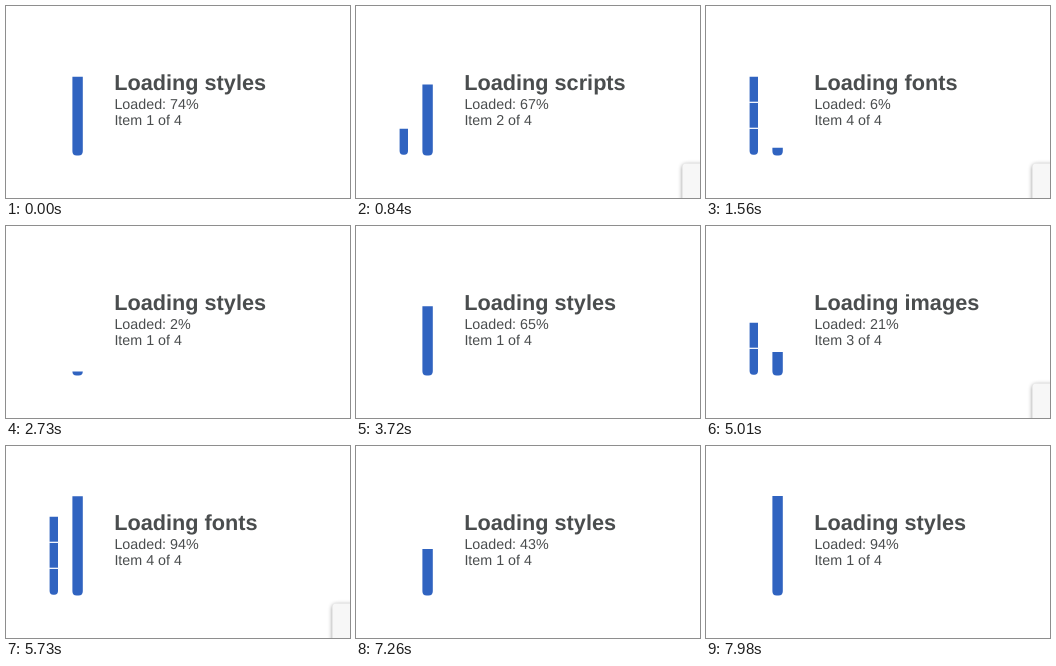
These frames come from a looping animation (344x192 px, 8 s). An HTML page:

```html
<!DOCTYPE html>
<html lang="en">
<head>
<meta charset="utf-8">
<title>Loading</title>
<style>
html, body { margin: 0; width: 100%; height: 100%; overflow: hidden; background: #fff; }
svg { display: block; width: 344px; height: 192px; }
text {
  font-family: "Liberation Sans", Arial, sans-serif;
  font-size: 14.3px;
  fill: #4a4d4e;
  text-rendering: geometricPrecision;
}
#title { font-size: 21.7px; font-weight: bold; }
.bar { fill: #3063c0; }
.gap { fill: #f0f4fb; }
#panel { fill: #f7f7f7; filter: drop-shadow(0 1px 2px rgba(0, 0, 0, .45)); }
</style>
</head>
<body>
<svg viewBox="0 0 344 192">
  <path id="stack" class="bar"/>
  <g id="gaps"></g>
  <path id="bar" class="bar"/>
  <text id="title" x="108.2" y="84"></text>
  <text id="loaded" x="108.4" y="102.8"></text>
  <text id="item" x="108.4" y="119.1"></text>
  <rect id="panel" x="326.3" y="157.5" width="40" height="60" rx="4"/>
</svg>
<script>
const LOOP = 8000, CYCLE = 3840, OFFSET = 1230, STEP = 30;
const PANEL_IN = 1575, PANEL_OUT = 3450;
const SEGMENT = 26, STACK_BOTTOM = 148.7;
const names = ["styles", "scripts", "images", "fonts"];

// [time in cycle, percent summed over all items]
const progress = [
  [0, 0], [210, 4], [414, 15], [810, 43], [1110, 65], [1230, 74], [1530, 94],
  [1603, 100], [2303, 200], [2768, 300], [3143, 400], [CYCLE, 400]
];

const el = id => document.getElementById(id);

function totalAt(time) {
  const i = progress.findIndex(([end]) => end > time);
  const [t0, p0] = progress[i - 1], [t1, p1] = progress[i];
  return p0 + (p1 - p0) * (time - t0) / (t1 - t0);
}

// Flat top, rounded bottom corners
function barPath(x, width, top, bottom, radius) {
  const height = bottom - top;
  if (height <= 0) return "";
  const r = Math.min(radius, height);
  return `M${x} ${top}h${width}v${height - r}q0 ${r} ${-r} ${r}` +
    `h${2 * r - width}q${-r} 0 ${-r} ${-r}z`;
}

for (let i = 1; i < names.length; i++) {
  const gap = document.createElementNS("http://www.w3.org/2000/svg", "rect");
  gap.setAttribute("class", "gap");
  gap.setAttribute("x", 43);
  gap.setAttribute("y", STACK_BOTTOM - i * SEGMENT - 1);
  gap.setAttribute("width", 10);
  gap.setAttribute("height", 1.3);
  el("gaps").append(gap);
}

function draw(time) {
  const t = (time + OFFSET) % CYCLE;
  const total = totalAt(t);
  const done = Math.floor(total / 100);
  const index = Math.min(done, names.length - 1);
  const percent = total - index * 100;

  el("title").textContent = "Loading " + names[index];
  el("loaded").textContent = `Loaded: ${Math.round(percent)}%`;
  el("item").textContent = `Item ${index + 1} of ${names.length}`;
  el("bar").setAttribute("d", percent > 0 ? barPath(66.4, 10.4, 147.8 - 1.04 * percent, 149.5, 4.2) : "");
  el("stack").setAttribute("d", barPath(43.6, 8.4, STACK_BOTTOM - done * SEGMENT, STACK_BOTTOM, 3.6));
  [...el("gaps").children].forEach((gap, i) => {
    gap.style.display = i + 1 < done ? "" : "none";
  });
  el("panel").style.display = t >= PANEL_IN && t < PANEL_OUT ? "" : "none";
}

const start = performance.now();
function tick() {
  const time = (performance.now() - start) % LOOP;
  draw(Math.floor(time / STEP) * STEP);
  requestAnimationFrame(tick);
}
tick();
</script>
</body>
</html>
```
